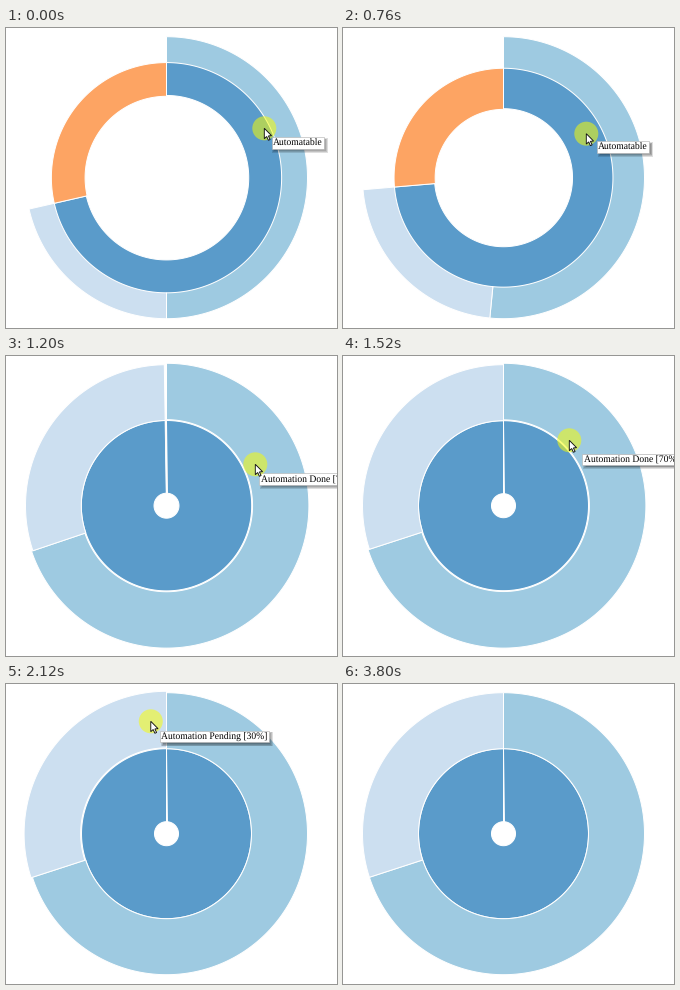
A matplotlib script for the animation above (3.88 s loop, 331 by 300 pixels).

```python
import numpy as np
import matplotlib.pyplot as plt
from matplotlib.animation import FuncAnimation
from matplotlib.patches import Circle, Polygon, Rectangle

W, H, DPI = 331, 300, 100
STEP, LOOP = 40, 3880
CX, CY, R = 160.5, 149.7, 141
HOLE = 12                      # centre radius once zoomed in
PART = 5 / 7                   # share of the zoomed branch
ZOOM_START, ZOOM_TIME = 537, 750
LEAVE = 2680                   # pointer leaves the stage
LAG = 36                       # tooltip trails the pointer
FONT = 9.6

plt.rcParams["text.hinting"] = "none"


def px(n):
    return n * 72 / DPI


# label, start, end, ring, colour
ITEMS = [
    ("Automatable", 0, PART, 1, "#5a9bca"),
    ("", PART, 1, 1, "#fda463"),
    ("Automation Done [70%]", 0, 0.7 * PART, 2, "#9ecae1"),
    ("Automation Pending [30%]", 0.7 * PART, PART, 2, "#ccdff0"),
]

# pointer path: time, x, y
PATH = np.array([
    (0, 258, 100), (240, 257, 100), (620, 257, 100), (880, 231, 110),
    (1000, 231, 110), (1200, 249, 108), (1360, 252, 104),
    (1760, 187, 54), (2100, 144.5, 37), (2520, 144, 37),
])

ARROW = np.array([(0, 0), (0, 10.4), (2.4, 8.2), (4.1, 12),
                  (5.8, 11.2), (4.1, 7.6), (7.3, 7.4)])


def zoom_at(t):
    """Cubic ease in and out."""
    u = np.clip((t - ZOOM_START) / ZOOM_TIME, 0, 1)
    return 4 * u ** 3 if u < 0.5 else 1 - 4 * (1 - u) ** 3


def angle(v, k):
    return 2 * np.pi * min(1, v / (1 - k * (1 - PART)))


def radius(ring, k):
    """Square-root scale whose domain and range both follow the zoom."""
    low, base = np.sqrt(k / 3), HOLE * k
    return base + (np.sqrt(ring / 3) - low) / (1 - low) * (R - base)


def pointer(t):
    return np.array([np.interp(t, PATH[:, 0], PATH[:, i]) for i in (1, 2)])


def sector(a0, a1, r0, r1):
    a = np.linspace(a0, a1, 240)
    a = np.concatenate([a, a[::-1]])
    r = np.repeat([r1, r0], 240)
    return np.column_stack([CX + r * np.sin(a), CY - r * np.cos(a)])


def item_under(pos, k):
    dx, dy = pos - (CX, CY)
    dist, a = np.hypot(dx, dy), np.arctan2(dx, -dy) % (2 * np.pi)
    for i, (_, start, end, ring, _) in enumerate(ITEMS):
        inside = radius(ring, k) <= dist < radius(ring + 1, k)
        if inside and angle(start, k) <= a < angle(end, k):
            return i
    return None


fig = plt.figure(figsize=(W / DPI, H / DPI), dpi=DPI, facecolor="white")
ax = fig.add_axes([0, 0, 1, 1])
ax.set_xlim(0, W)
ax.set_ylim(H, 0)
ax.axis("off")

sectors = [ax.add_patch(Polygon([(0, 0), (1, 1), (1, 0)], fc=item[4],
                                ec="white", lw=px(1), zorder=1))
           for item in ITEMS]
shadows = [ax.add_patch(Rectangle((0, 0), 1, 1, fc="black", lw=0,
                                  alpha=0.13, zorder=2)) for _ in range(4)]
box = ax.add_patch(Rectangle((0, 0), 1, 11.5, fc="white", ec="#b4b4b4",
                             lw=px(0.6), zorder=3))
label = ax.text(0, 0, "", family="Liberation Serif", size=px(FONT),
                color="black", va="baseline", zorder=4)
halo = ax.add_patch(Circle((0, 0), 12, fc="#faff00", lw=0, alpha=0.52,
                           zorder=5))
arrow = ax.add_patch(Polygon(ARROW, fc="white", ec="#111111", lw=px(0.9),
                             zorder=6))
tip_parts = [*shadows, box, label]


def text_width(s):
    label.set_text(s)
    return label.get_window_extent().width


WIDTHS = [text_width(item[0]) if item[0] else 0 for item in ITEMS]


def place_tooltip(i, t):
    x, y = pointer(t - LAG) + (7.6, 9)
    w, h = WIDTHS[i] + 2.4, 11.5
    box.set_bounds(x, y, w, h)
    for n, s in enumerate(shadows):
        grow = 1.6 - 0.8 * n
        s.set_bounds(x + 2.4 - grow, y + 2.4 - grow,
                     w + 2 * grow, h + 2 * grow)
    label.set_text(ITEMS[i][0])
    label.set_position((x + 1.2, y + 8.9))


def draw(frame):
    t = frame * STEP
    k = zoom_at(t)
    present = t < LEAVE
    pos = pointer(t)
    hot = item_under(pos, k) if present else None

    for i, (_, start, end, ring, _) in enumerate(ITEMS):
        grow = 1.01 if i == hot else 1
        sectors[i].set_xy(sector(angle(start, k), angle(end, k),
                                 grow * radius(ring, k),
                                 grow * radius(ring + 1, k)))
    for part in tip_parts:
        part.set_visible(hot is not None)
    if hot is not None:
        place_tooltip(hot, t)

    halo.set_visible(present)
    arrow.set_visible(present)
    halo.center = tuple(pos + 0.3)
    arrow.set_xy(ARROW + pos + 0.3)
    return [*sectors, *tip_parts, halo, arrow]


anim = FuncAnimation(fig, draw, frames=LOOP // STEP, interval=STEP,
                     repeat=True, repeat_delay=0)
plt.show()
```
